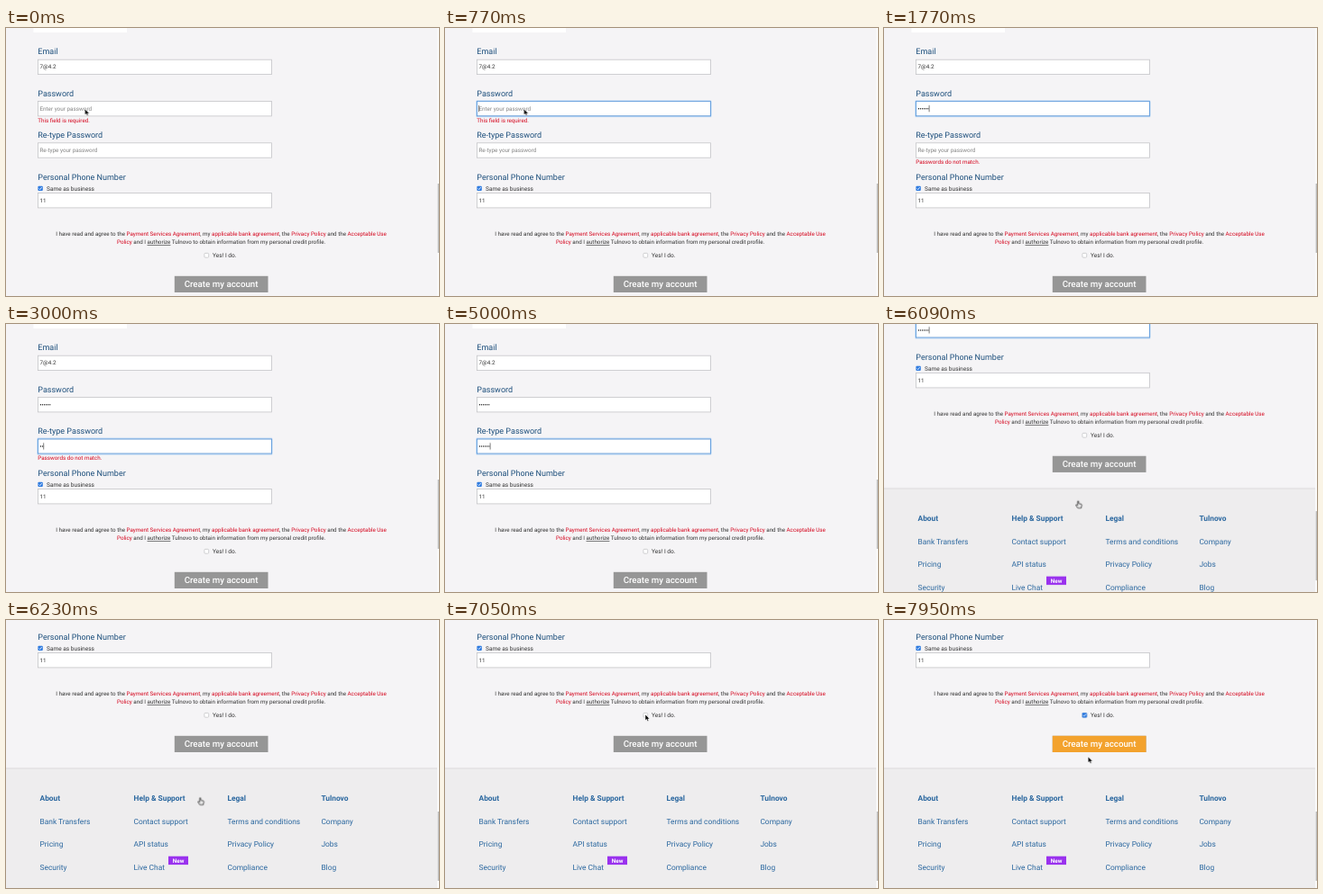
Recreate the animation shown at these times as an HTML page. Size 480x298 px, loop 8000 ms.

```html
<!DOCTYPE html>
<html lang="en">
<head>
<meta charset="utf-8">
<title>Account form</title>
<style>
html, body { margin: 0; width: 100%; height: 100%; overflow: hidden; background: #f5f4f6; }
svg { display: block; width: 100vw; height: 100vh; }
text { font: 6.25px Roboto, sans-serif; fill: #333; white-space: pre; text-rendering: geometricPrecision; }
.label { font-size: 9px; fill: #1d4f7c; }
.small { font-size: 6.55px; }
.hint { font-size: 6.35px; fill: #858585; }
.red { fill: #d5061e; }
.mid { text-anchor: middle; }
.box { fill: #fff; stroke: #c4c4c7; stroke-width: .8; }
.links text { font-size: 8.4px; fill: #2a679f; }
.links .head { font-weight: 700; }
.submit { font-size: 9.75px; font-weight: 500; fill: #fff; }

/* One loop is 8 s, so 1% is 80 ms */
.scroll, .thumb, .mouse, .pen { animation: 8s linear infinite; }
.step { animation: 8s step-end infinite; }
.scroll { animation-name: scroll; }
.thumb { animation-name: thumb; }
.mouse { animation-name: mouse; }
.pen1 { animation-name: type1; }
.pen2 { animation-name: type2; }
.hint1 { animation-name: hint1; }
.hint2 { animation-name: hint2; }
.missing { animation-name: missing; }
.mismatch { animation-name: mismatch; }
.focus1 { animation-name: focus1; }
.focus2 { animation-name: focus2; }
.caret1 { animation-name: caret1; }
.caret2 { animation-name: caret2; }
.arrow { animation-name: arrow; }
.beam { animation-name: beam; }
.hand { animation-name: hand; }
.agreed { animation-name: agreed; }

@keyframes scroll {
  0%, 72.08% { transform: none; animation-timing-function: cubic-bezier(.4, 0, .6, 1); }
  77.4%, 100% { transform: translateY(-147px); }
}
@keyframes thumb {
  0%, 72.08% { transform: none; animation-timing-function: cubic-bezier(.4, 0, .6, 1); }
  77.4%, 100% { transform: translateY(40px); }
}
@keyframes mouse {
  0%, 70% { transform: translate(87.5px, 90px); animation-timing-function: step-end; }
  70.01%, 74% { transform: translate(215px, 194.5px); }
  77%, 82.5% { transform: translate(215.3px, 197.5px); animation-timing-function: ease-in-out; }
  88%, 92.5% { transform: translate(222px, 105px); animation-timing-function: ease-in-out; }
  97.5%, 100% { transform: translate(226.3px, 152px); }
}
@keyframes type1 {
  0%, 11% { transform: none; animation-timing-function: steps(6); }
  20.5%, 100% { transform: translateX(12.6px); }
}
@keyframes type2 {
  0%, 32.8% { transform: none; animation-timing-function: steps(6); }
  46%, 100% { transform: translateX(12.6px); }
}
@keyframes hint1 { 0% { opacity: 1; } 12.58%, 100% { opacity: 0; } }
@keyframes hint2 { 0% { opacity: 1; } 35%, 100% { opacity: 0; } }
@keyframes missing { 0% { opacity: 1; } 12.58%, 100% { opacity: 0; } }
@keyframes mismatch { 0% { opacity: 0; } 12.58% { opacity: 1; } 46%, 100% { opacity: 0; } }
@keyframes focus1 { 0% { opacity: 0; } 4% { opacity: 1; } 29%, 100% { opacity: 0; } }
@keyframes focus2 { 0% { opacity: 0; } 29%, 100% { opacity: 1; } }
@keyframes caret1 {
  0%, 10.25%, 26.75%, 100% { opacity: 0; }
  4%, 12.58% { opacity: 1; }
}
@keyframes caret2 {
  0%, 52.25%, 64.75%, 77.25%, 100% { opacity: 0; }
  29%, 58.5%, 71% { opacity: 1; }
}
@keyframes arrow { 0%, 83%, 100% { opacity: 1; } 12.58% { opacity: 0; } }
@keyframes beam { 0%, 75%, 100% { opacity: 0; } 70.5% { opacity: 1; } }
@keyframes hand { 0%, 83%, 100% { opacity: 0; } 75% { opacity: 1; } }
@keyframes agreed { 0% { opacity: 0; } 90%, 100% { opacity: 1; } }
</style>
</head>
<body>
<svg viewBox="0 0 480 298" preserveAspectRatio="none">
  <defs>
    <rect id="field" class="box" x="35.4" y=".4" width="259" height="16.4"/>
    <g id="glow" fill="none">
      <rect x="34.8" y="-.2" width="260.2" height="17.6" rx="1" stroke="#c3dcf5" stroke-width="1.2"/>
      <rect x="35.4" y=".4" width="259" height="16.4" stroke="#5c9ade" stroke-width=".9"/>
    </g>
    <path id="dots" d="M38.4 8.6h10.6" stroke="#222" stroke-width="1.4" stroke-linecap="round" stroke-dasharray="0 2.1"/>
    <g id="tick">
      <rect width="5.4" height="5.4" rx="1" fill="#2f7be0"/>
      <path d="M1.2 2.8l1.1 1.2 2-2.7" fill="none" stroke="#fff" stroke-width=".8"/>
    </g>
  </defs>

  <rect width="480" height="298" fill="#f5f4f6"/>
  <g class="scroll">
    <rect x="30.5" width="103.5" height="5" fill="#fff"/>

    <text class="label" x="35.3" y="29.3">Email</text>
    <use href="#field" y="34.8"/>
    <text x="37.6" y="45.4">7@4.2</text>

    <text class="label" x="35.3" y="75.8">Password</text>
    <g transform="translate(0 81.1)">
      <use href="#field"/>
      <use href="#dots"/>
      <g class="pen pen1">
        <rect x="37.3" y="5" width="14" height="7" fill="#fff"/>
        <rect class="step caret1" x="37.3" y="4.8" width=".6" height="7.4" fill="#222"/>
      </g>
      <text class="hint step hint1" x="37.4" y="10.7">Enter your password</text>
      <use class="step focus1" href="#glow"/>
    </g>
    <text class="red step missing" x="35.3" y="104.8">This field is required.</text>

    <text class="label" x="35.3" y="122.1">Re-type Password</text>
    <g transform="translate(0 127.4)">
      <use href="#field"/>
      <use href="#dots"/>
      <g class="pen pen2">
        <rect x="37.3" y="5" width="14" height="7" fill="#fff"/>
        <rect class="step caret2" x="37.3" y="4.8" width=".6" height="7.4" fill="#222"/>
      </g>
      <text class="hint step hint2" x="37.4" y="10.7">Re-type your password</text>
      <use class="step focus2" href="#glow"/>
    </g>
    <text class="red step mismatch" x="35.3" y="151.2">Passwords do not match.</text>

    <text class="label" x="35.3" y="168.6">Personal Phone Number</text>
    <use href="#tick" x="35.4" y="175.7"/>
    <text class="small" x="45" y="180.6">Same as business</text>
    <use href="#field" y="183.1"/>
    <text x="37.6" y="193.8">11</text>

    <text class="mid" x="238.6" y="231.1">I have read and agree to the <tspan class="red">Payment Services Agreement</tspan>, my <tspan class="red">applicable bank agreement</tspan>, the <tspan class="red">Privacy Policy</tspan> and the <tspan class="red">Acceptable Use</tspan></text>
    <text class="mid" x="238.6" y="240"><tspan class="red">Policy</tspan> and I <tspan text-decoration="underline">authorize</tspan> Tulnovo to obtain information from my personal credit profile.</text>

    <rect class="box" x="219.9" y="250.4" width="4.8" height="4.8" rx="1"/>
    <use class="step agreed" href="#tick" x="219.6" y="250.1"/>
    <text class="small" x="229" y="255.1">Yes! I do.</text>

    <rect x="186.8" y="275.8" width="103.7" height="18.2" fill="#969696"/>
    <rect class="step agreed" x="186.8" y="275.8" width="103.7" height="18.2" fill="#f3a22d"/>
    <text class="submit mid" x="238.6" y="288.3">Create my account</text>

    <rect y="311.6" width="480" height="140" fill="#eeedee"/>
    <rect y="311.6" width="480" height=".8" fill="#d6d5d7"/>
    <g class="links">
      <g transform="translate(37.5 348)">
        <text class="head">About</text><text y="25.5">Bank Transfers</text><text y="51">Pricing</text><text y="76.5">Security</text>
      </g>
      <g transform="translate(141.5 348)">
        <text class="head">Help &amp; Support</text><text y="25.5">Contact support</text><text y="51">API status</text><text y="76.5">Live Chat</text>
      </g>
      <g transform="translate(245.5 348)">
        <text class="head">Legal</text><text y="25.5">Terms and conditions</text><text y="51">Privacy Policy</text><text y="76.5">Compliance</text>
      </g>
      <g transform="translate(349.4 348)">
        <text class="head">Tulnovo</text><text y="25.5">Company</text><text y="51">Jobs</text><text y="76.5">Blog</text>
      </g>
    </g>
    <rect x="180" y="409.7" width="22" height="9.4" fill="#9a32ee"/>
    <text class="mid" x="191" y="416.6" style="fill:#fff;font-weight:700;font-size:6.4px">New</text>
  </g>

  <rect x="478" width="2" height="298" fill="#fafafa"/>
  <rect class="thumb" x="478.6" y="173" width="1.4" height="77" fill="#b9b9b9"/>

  <g class="mouse">
    <path class="step arrow" d="M0 0V6.6L1.5 5.3 2.6 7.6 3.8 7.1 2.8 4.9H4.8Z" fill="#000" stroke="#fff" stroke-width=".5"/>
    <path class="step beam" d="M-1.2 0Q0 0 0 1V6.4Q0 7.4-1.2 7.4M1.2 0Q0 0 0 1M0 6.4Q0 7.4 1.2 7.4M-.8 4.6H.8" fill="none" stroke="#222" stroke-width=".7"/>
    <path class="step hand" d="M-.7 .5Q0-.3 .7 .5V3L3.4 3.5Q4.3 3.8 4.1 5L3.4 8H-.4L-2.6 4.9Q-2.5 3.9-1.5 4.4L-.7 5Z" fill="#e4e4e4" stroke="#222" stroke-width=".7" stroke-linejoin="round"/>
  </g>
</svg>
</body>
</html>
```
